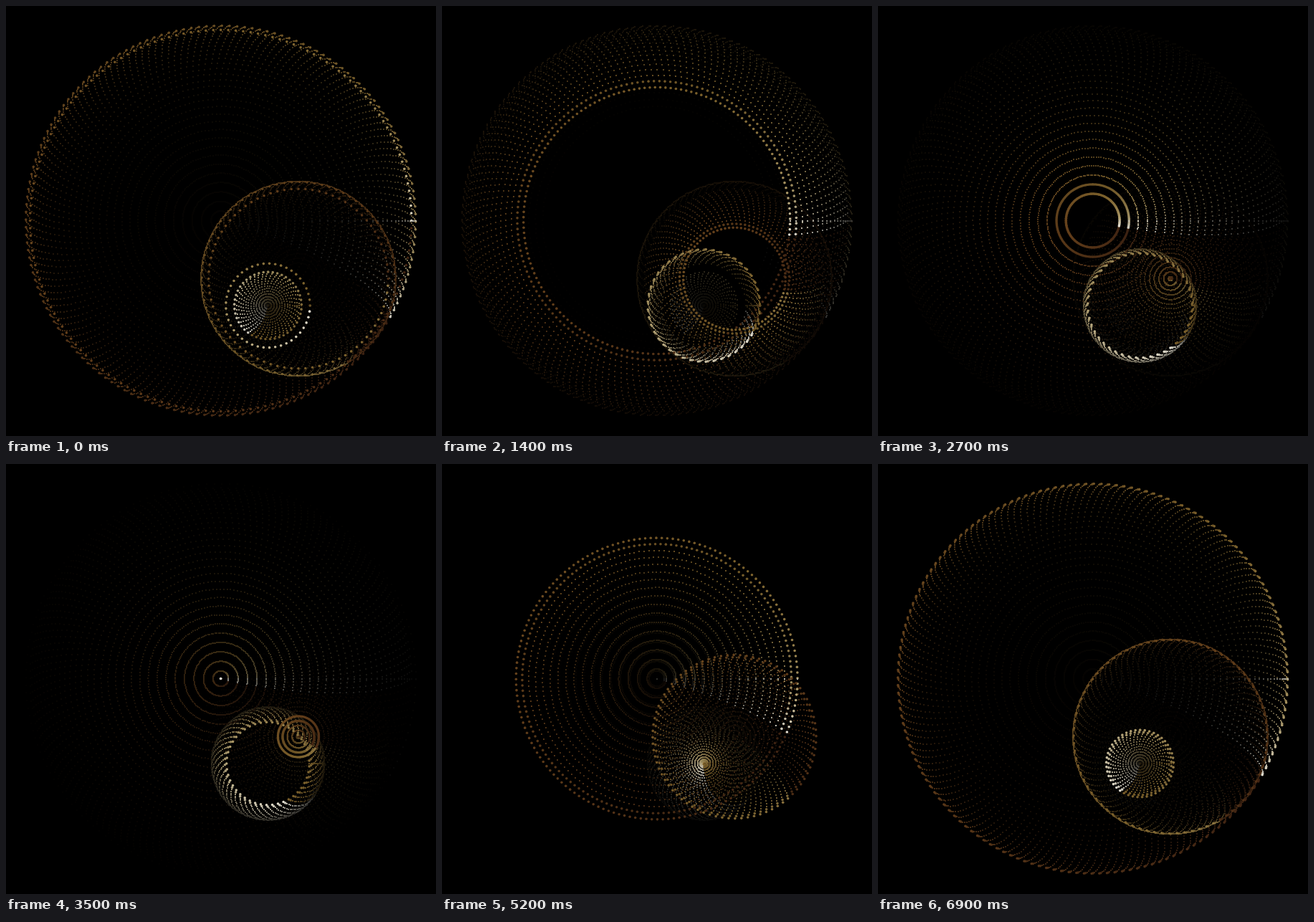
An HTML page with a canvas for the animation above (7 s loop, 600x600 px).

```html
<!DOCTYPE html>
<html lang="en">
<head>
<meta charset="utf-8">
<title>Pulsing dot rings</title>
<style>
html, body { margin: 0; width: 100%; height: 100%; overflow: hidden; background: #000; }
canvas { display: block; width: 600px; height: 600px; }
</style>
</head>
<body>
<canvas id="stage" width="600" height="600"></canvas>
<script>
const ctx = document.getElementById('stage').getContext('2d');
const STEPS = 70, STEP_MS = 100, TRAIL = 36, FADE = 0.91;
const TAU = Math.PI * 2;

// From dark brown over gold to white
const palette = [[68, 38, 20], [104, 66, 28], [130, 102, 46], [180, 160, 108], [238, 234, 220]];

// shrunk: step at which a ring reaches its centre; grow: step at which it opens again
// turn: turn per loop; shade: place in the palette along the ring
const rings = [
  { x: 299.7, y: 299.5, r: 272, dots: 160, turn: TAU / 12, shrunk: 29.8, grow: 35, tick: true,
    shade: t => .62 * (1 - t) + .38 * Math.exp(-t / .06) },
  { x: 408, y: 380.5, r: 136, dots: 80, turn: TAU / 6, shrunk: 25.4, grow: 30.7,
    shade: t => .08 + .5 * t },
  { x: 365.5, y: 418, r: 79, dots: 45, turn: TAU / 3, shrunk: 52.3, grow: 55.8, tick: true,
    shade: t => .48 + .52 * t ** 1.3 }
];

function tint(v) {
  const p = v * (palette.length - 1), i = Math.min(Math.floor(p), palette.length - 2);
  return palette[i].map((c, j) => c + (palette[i + 1][j] - c) * (p - i));
}

for (const ring of rings) {
  ring.tints = Array.from({ length: ring.dots }, (_, i) => tint(ring.shade(i / (ring.dots - 1))));
}

// A sine swell, a little steeper near the centre
function swell(k) {
  const a = Math.PI * Math.min(k, STEPS - k) / STEPS;
  return a <= 0 ? 0 : Math.sin(a) + .03 * Math.sin(2 * a) + .01 * Math.sin(4 * a);
}

function radius(ring, n) {
  return ring.r * swell(n <= ring.shrunk ? ring.shrunk - n : n - ring.grow);
}

function dot(x, y, color, age) {
  const light = .95 * FADE ** age;
  ctx.fillStyle = `rgb(${color.map(c => Math.round(c * light))})`;
  if (age < 2) {
    ctx.beginPath();
    ctx.arc(x, y, 1.8, 0, TAU);
    ctx.fill();
  } else {
    ctx.fillRect(Math.round(x - 1), Math.round(y - 1), 2, 2);
  }
}

function drawRing(ring, n, age) {
  const r = radius(ring, n), seam = ring.turn * n / STEPS;
  if (r < 1) {
    dot(ring.x, ring.y, ring.tints[0], age);
    return;
  }
  for (let i = ring.dots - 1; i >= 0; i--) {
    const a = seam - i * TAU / ring.dots;
    dot(ring.x + r * Math.cos(a), ring.y + r * Math.sin(a), ring.tints[i], age);
  }
  if (ring.tick) dot(ring.x + r, ring.y, ring.tints[0], Math.max(age, 2));
}

function draw(step) {
  ctx.fillStyle = '#000';
  ctx.fillRect(0, 0, 600, 600);
  for (let age = TRAIL; age >= 0; age--) {
    const n = (step - age + STEPS) % STEPS;
    for (const ring of rings) drawRing(ring, n, age);
  }
}

let shown = -1;
const start = performance.now();
function tick() {
  const step = Math.floor((performance.now() - start) / STEP_MS) % STEPS;
  if (step !== shown) draw(shown = step);
  requestAnimationFrame(tick);
}
tick();
</script>
</body>
</html>
```
